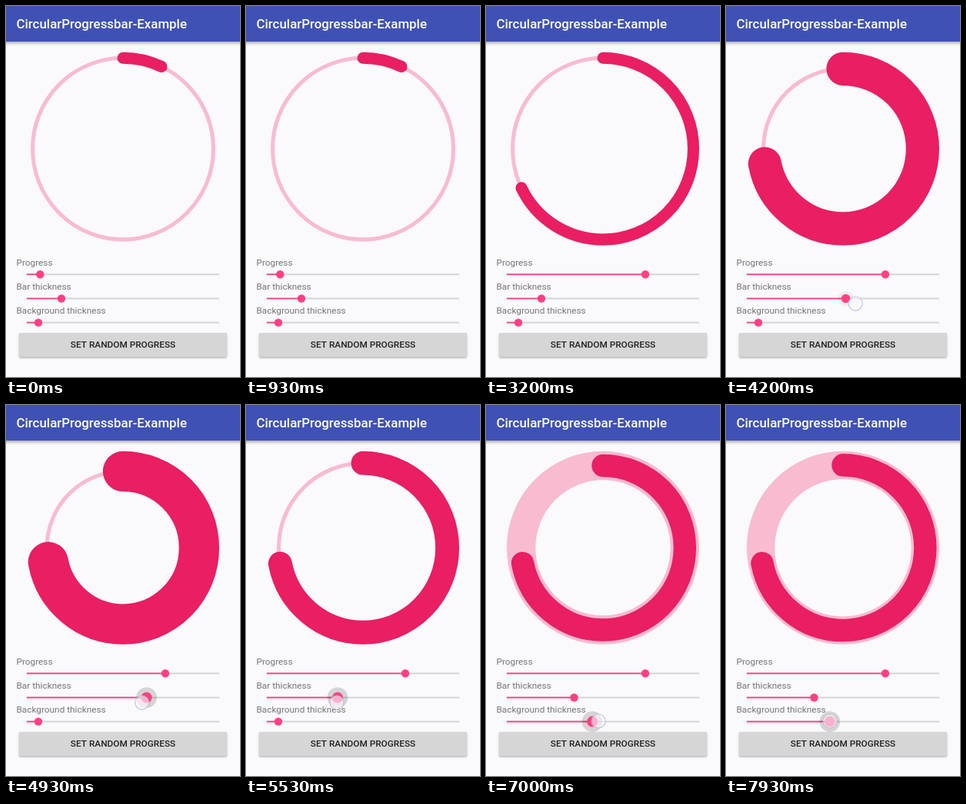
These frames come from a looping animation (304 px wide and 480 px high, 8000 ms). An HTML page with a canvas:

```html
<!DOCTYPE html>
<html lang="en">
<head>
<meta charset="utf-8">
<title>Circular progress bar</title>
<style>
  html, body { margin: 0; width: 100%; height: 100%; overflow: hidden; background: #faf9fc; }
  canvas { display: block; width: 304px; height: 480px; }
</style>
</head>
<body>
<canvas id="stage"></canvas>
<script>
const W = 304, H = 480, LOOP = 8000;
const CX = 152, CY = 184.7, OUTER = 125;
const LEFT = 27, TRACK = 250;
const PX_PER_STEP = 0.336;
const LAG = 55;
const CLICK = 1906, SWEEP = 1728;
const PINK = '#ff4081';
const FONT = 'Roboto, "Noto Sans", sans-serif';

// Finger paths as [time, x]
const barDrag = [[3800, 72], [4200, 168], [4500, 205], [4800, 190],
                 [5400, 123], [5530, 118], [5800, 114.5]];
const backDrag = [[6350, 42], [7000, 146], [7300, 165], [7650, 138],
                  [7850, 135], [7930, 135]];

const canvas = document.getElementById('stage');
const ctx = canvas.getContext('2d');
const scale = window.devicePixelRatio || 1;
canvas.width = W * scale;
canvas.height = H * scale;

const clamp = v => Math.max(0, Math.min(1, v));
const ramp = (t, from, to) => clamp((t - from) / (to - from));

// Smooth curve through the keys, held still before and after
function follow(keys, t) {
  const last = keys.length - 1;
  if (t <= keys[0][0]) return keys[0][1];
  if (t >= keys[last][0]) return keys[last][1];
  const i = keys.findIndex(k => k[0] > t) - 1;
  const slope = n => {
    const a = keys[Math.max(0, n - 1)], b = keys[Math.min(last, n + 1)];
    return n === 0 || n === last ? 0 : (b[1] - a[1]) / (b[0] - a[0]);
  };
  const [t0, x0] = keys[i], [t1, x1] = keys[i + 1];
  const d = t1 - t0, u = (t - t0) / d, v = 1 - u;
  return x0 * v * v * (1 + 2 * u) + x1 * u * u * (3 - 2 * u)
       + d * u * v * (v * slope(i) - u * slope(i + 1));
}

function disc(x, y, r, color) {
  ctx.fillStyle = color;
  ctx.beginPath();
  ctx.arc(x, y, r, 0, Math.PI * 2);
  ctx.fill();
}

function text(str, x, y, size, color, weight = 400, align = 'left') {
  ctx.font = `${weight} ${size}px ${FONT}`;
  ctx.textAlign = align;
  ctx.fillStyle = color;
  ctx.fillText(str, x, y);
}

function ring(r, width, color, share) {
  ctx.strokeStyle = color;
  ctx.lineWidth = width;
  ctx.lineCap = 'round';
  ctx.beginPath();
  ctx.arc(CX, CY, r, -Math.PI / 2, -Math.PI / 2 + share * Math.PI * 2);
  ctx.stroke();
}

function slider(label, y, x, press = 0) {
  text(label, 13.5, y - 11.2, 11.82, '#757575');
  ctx.fillStyle = '#d2d1d4';
  ctx.fillRect(LEFT, y - 0.9, TRACK, 1.8);
  ctx.fillStyle = PINK;
  ctx.fillRect(LEFT, y - 0.9, x - LEFT, 1.8);
  if (press) disc(x, y, 8 + 5.3 * press, `rgba(0,0,0,${0.15 * press})`);
  disc(x, y, 5.2 + 1.8 * press, PINK);
}

function finger(x, y, alpha) {
  if (!alpha) return;
  ctx.globalAlpha = alpha;
  disc(x, y, 9, 'rgba(250,250,255,.6)');
  ctx.strokeStyle = 'rgba(185,188,212,.85)';
  ctx.lineWidth = 1.2;
  ctx.beginPath();
  ctx.arc(x, y, 9, 0, Math.PI * 2);
  ctx.stroke();
  ctx.globalAlpha = 1;
}

function shadow(color, blur, dy) {
  ctx.shadowColor = color;
  ctx.shadowBlur = blur * scale;
  ctx.shadowOffsetY = dy * scale;
}

function header() {
  ctx.save();
  shadow('rgba(0,0,0,.35)', 4, 1.5);
  ctx.fillStyle = '#3f51b5';
  ctx.fillRect(-8, -8, W + 16, 54);
  ctx.restore();
  text('CircularProgressbar-Example', 13.5, 28.8, 16.89, '#fff', 500);
}

function button(t) {
  const lift = ramp(t, 1830, 1950) * (1 - ramp(t, 2050, 2300));
  ctx.save();
  shadow('rgba(0,0,0,.32)', 2.5 + 2 * lift, 1.2 + lift);
  ctx.fillStyle = '#d6d6d7';
  ctx.beginPath();
  ctx.roundRect(17, 423, 270, 31, 1.7);
  ctx.fill();
  ctx.restore();

  const spread = ramp(t, 1840, 2350);
  const fade = 1 - ramp(t, 2100, 2500);
  if (spread && fade) {
    ctx.save();
    ctx.clip();
    disc(241, 432, 230 * spread, `rgba(0,0,0,${0.04 * fade})`);
    ctx.restore();
  }
  text('SET RANDOM PROGRESS', 152, 442.3, 11.82, '#212121', 500, 'center');
}

function draw(t) {
  ctx.setTransform(scale, 0, 0, scale, 0, 0);
  ctx.fillStyle = '#faf9fc';
  ctx.fillRect(0, 0, W, H);

  const barX = follow(barDrag, t - LAG);
  const backX = follow(backDrag, t - LAG);
  const bar = (barX - LEFT) * PX_PER_STEP;
  const back = (backX - LEFT) * PX_PER_STEP;
  const radius = OUTER - Math.max(bar, back) / 2;
  const rest = 1 - ramp(t, CLICK, CLICK + SWEEP);
  const share = 0.07 + 0.65 * (1 - rest * rest);

  ring(radius, back, '#f8bbd0', 1);
  ring(radius, bar, '#e91e63', share);
  header();

  const barPress = ramp(t, 4080, 4450) * (1 - ramp(t, 5850, 6050));
  const backPress = ramp(t, 6400, 6700);
  slider('Progress', 347.3, t < CLICK ? 44.3 : 207);
  slider('Bar thickness', 378.5, barX, barPress);
  button(t);
  slider('Background thickness', 409.6, backX, backPress);

  finger(241, 432, ramp(t, 1450, 1550) * (1 - ramp(t, 2660, 2780)));
  finger(follow(barDrag, t), 385, ramp(t, 3650, 3750) * (1 - ramp(t, 5850, 5980)));
  finger(follow(backDrag, t), 409, ramp(t, 6200, 6300));
}

function tick() {
  draw(performance.now() % LOOP);
  requestAnimationFrame(tick);
}
tick();
</script>
</body>
</html>
```
